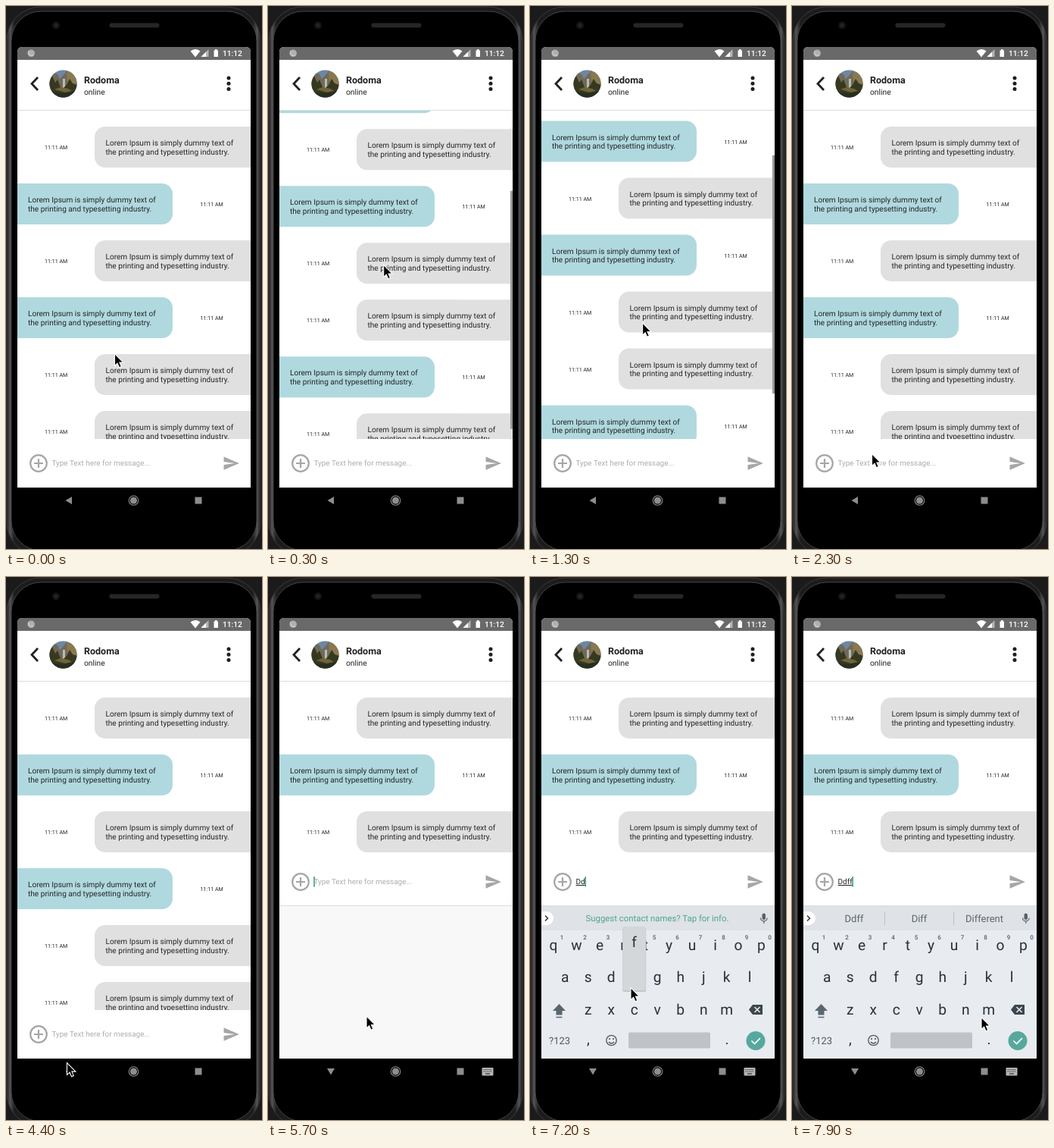
Animation, 338 px wide and 716 px high, one loop 8000 ms. Source, as an HTML page:

```html
<!DOCTYPE html>
<html lang="en">
<head>
<meta charset="utf-8">
<title>Chat screen</title>
<style>
  html, body { margin: 0; width: 100%; height: 100%; overflow: hidden; background: #1b1b1b; }
  svg { display: block; width: 100vw; height: 100vh; font-family: Roboto, Arial, sans-serif; text-rendering: geometricPrecision; }
  .msg { font-size: 10.1px; fill: #262626; }
  .time { font-size: 7.1px; fill: #222; }
  .key { font-size: 19.2px; fill: #263238; text-anchor: middle; }
  .digit { font-size: 8px; font-weight: 500; fill: #56616a; text-anchor: middle; }
  .hint { font-size: 13px; fill: #5c6770; text-anchor: middle; }
</style>
</head>
<body>
<svg viewBox="0 0 338 716" preserveAspectRatio="none">
  <defs>
    <clipPath id="face"><circle cx="75.5" cy="102.5" r="18"/></clipPath>
    <clipPath id="view"><rect id="viewRect" x="15" y="138" width="308"/></clipPath>
    <clipPath id="screen"><rect x="15" y="54" width="308" height="581"/></clipPath>
    <linearGradient id="rim" x2="1" y2="0">
      <stop offset="0" stop-color="#1a1a1a"/><stop offset=".013" stop-color="#555"/>
      <stop offset=".03" stop-color="#1c1c1c"/><stop offset=".97" stop-color="#1c1c1c"/>
      <stop offset=".987" stop-color="#555"/><stop offset="1" stop-color="#1a1a1a"/>
    </linearGradient>
  </defs>

  <g id="phone">
    <rect width="338" height="716" fill="#1b1b1b"/>
    <rect x="1" y="1" width="335" height="724" rx="45" fill="url(#rim)" stroke="#3a3a3a"/>
    <rect x="7" y="7" width="324" height="711" rx="39" fill="#000" stroke="#444"/>
    <circle cx="66" cy="25.500" r="5" fill="#121416"/>
    <circle cx="66" cy="25.500" r="2.500" fill="#20252c"/>
    <rect x="136.500" y="22.500" width="66" height="6" rx="3" fill="#262626"/>
    <path d="M15 635V60a6 6 0 0 1 6-6H317a6 6 0 0 1 6 6V635z" fill="#fff"/>
  </g>

  <g id="status">
    <path d="M15 71V60a6 6 0 0 1 6-6H317a6 6 0 0 1 6 6V71z" fill="#696969"/>
    <circle cx="33.200" cy="62.300" r="4.800" fill="#b0b0b0"/>
    <path d="M30 59a4.500 4.500 0 0 0 6 6" fill="none" stroke="#d6d6d6"/>
    <path d="M243.500 59.500q6.500-5 13 0L250 67.500z" fill="#fff"/>
    <path d="M267.500 57v10h-10z" fill="#b4b4b4"/><path d="M264 60.500v6.500h-6.500z" fill="#fff"/>
    <path d="M274.500 58.500h1.500v-1.500h2.500v1.500h1.500v8.500h-5.500z" fill="#fff"/>
    <text x="286" y="66" font-size="10.2" font-weight="500" fill="#fff">11:12</text>
  </g>

  <g id="header">
    <path d="M42 94l-8 8.500 8 8.500" fill="none" stroke="#222" stroke-width="2.800"/>
    <g clip-path="url(#face)">
      <rect x="57" y="84" width="37" height="37" fill="#6d87a3"/>
      <path d="M57 96l6-8 5 2 3 6 4-4 5-6 14 4v20H57z" fill="#716a58"/>
      <path d="M80 88l5-2 9 6v14H82z" fill="#8a7950"/>
      <path d="M75 96h3v12h-3z" fill="#b8bab4"/>
      <path d="M57 100l4-8 4 9 3-4 4 10 3 2 5-5 4-8 4 6 6 2v17H57z" fill="#363820"/>
      <path d="M64 110l8-3 10 2 5 3-9 2z" fill="#6f6436"/>
      <path d="M57 113l16 2 21-3v9H57z" fill="#292e22"/>
    </g>
    <text x="103" y="102" font-size="12.5" font-weight="700" fill="#1f1f1f">Rodoma</text>
    <text x="103" y="116.500" font-size="10.3" fill="#222">online</text>
    <g fill="#1f1f1f"><circle cx="294" cy="95" r="2.500"/><circle cx="294" cy="102.300" r="2.500"/><circle cx="294" cy="109.500" r="2.500"/></g>
    <path d="M15 137.500H323" stroke="#dcdcdc"/>
  </g>

  <g clip-path="url(#view)">
    <g id="list"></g>
    <rect id="thumb" x="320" width="3" height="314" fill="#989898"/>
  </g>

  <g id="composer">
    <rect x="15" y="571" width="308" height="64" fill="#fff"/>
    <g fill="none" stroke="#a6a6a6" stroke-width="2.200"><circle cx="43" cy="603" r="10.800"/><path d="M37 603h12M43 597v12"/></g>
    <text id="placeholder" x="60.500" y="606" font-size="9.95" fill="#adadad">Type Text here for message...</text>
    <text id="typed" x="60.500" y="606" font-size="10" fill="#222" text-decoration="underline"></text>
    <path id="caret" d="M0 596v13.500" stroke="#2f9184" stroke-width="1.500"/>
    <path transform="translate(285.600 591.400) scale(.97)" d="M2 21L23 12 2 3v7l15 2-15 2z" fill="#a6a6a6"/>
  </g>

  <g id="pane"><rect x="15" y="434" width="308" height="201" fill="#f8f8f8"/><path d="M15 433.500H323" stroke="#dcdcdc"/></g>
  <g id="keyboard" clip-path="url(#screen)">
    <rect x="15" y="434" width="308" height="201" fill="#e8ebef"/>
    <rect x="15" y="434" width="308" height="32" fill="#dfe2e6"/>
    <path d="M15 441h7a9 9 0 0 1 0 18h-7z" fill="#fff"/>
    <path d="M20 446.500l3.500 3.500-3.500 3.500" fill="none" stroke="#333" stroke-width="1.500"/>
    <text id="tip" x="168" y="454" font-size="11.4" fill="#4fa497" text-anchor="middle">Suggest contact names? Tap for info.</text>
    <g id="hints">
      <text class="hint" x="82" y="454.500">Ddff</text><text class="hint" x="168" y="454.500">Diff</text><text class="hint" x="254" y="454.500">Different</text>
      <path d="M122.500 441v18M213.500 441v18" stroke="#bcc2c7"/>
    </g>
    <rect x="306.500" y="443.500" width="4.500" height="8.500" rx="2.250" fill="#56616a"/>
    <path d="M304.500 449.500a4.300 4.300 0 0 0 8.600 0M308.800 454v3" fill="none" stroke="#56616a" stroke-width="1.200"/>
    <g id="keys"></g>
    <path id="shift" d="M38.500 563l8.500 9h-4.500v5.500h-8v-5.500H30z" fill="#5a666f"/>
    <path d="M34.500 580.500h8" stroke="#5a666f" stroke-width="1.500"/>
    <path d="M289 570.500l5-6.500h13v13h-13z" fill="#3c474e"/>
    <path d="M296.500 567l7 7m0-7l-7 7" stroke="#e8ebef" stroke-width="1.600"/>
    <text x="25" y="616" font-size="13" fill="#4d5960">?123</text>
    <text class="key" x="77" y="616">,</text><text class="key" x="260" y="616">.</text>
    <g fill="none" stroke="#4d5960" stroke-width="1.300"><circle cx="107.500" cy="611" r="6.700"/><path d="M104 613q3.500 4 7 0"/></g>
    <circle cx="105" cy="609" r="1.100" fill="#4d5960"/><circle cx="110" cy="609" r="1.100" fill="#4d5960"/>
    <rect x="130" y="600.500" width="108" height="21" rx="2" fill="#bfc3c8"/>
    <circle cx="298" cy="611.500" r="12.500" fill="#56a89d"/>
    <path d="M292.500 611.500l4 4 7.500-7.500" fill="none" stroke="#fff" stroke-width="1.700"/>
    <g id="popup">
      <rect x="-15.500" y="462" width="31" height="85" rx="2.500" fill="#c3c7ca"/>
      <rect x="-15" y="461" width="30" height="84" rx="2" fill="#d4d7d9"/>
      <text class="key" id="popupText" y="488"></text>
    </g>
  </g>

  <g id="nav" fill="#8d8d8d">
    <path id="back" d="M78.500 652l8.500-5v10z"/>
    <circle cx="168.500" cy="652" r="4.600"/><circle cx="168.500" cy="652" r="6.300" fill="none" stroke="#8d8d8d" stroke-width="1.100"/>
    <rect x="249.500" y="647.500" width="9" height="9"/>
    <g id="imeIcon">
      <rect x="282.500" y="647" width="15" height="10.500" rx="1" fill="#b5b5b5"/>
      <path d="M284.500 649.500h11M284.500 652h11" stroke="#333" stroke-width="1.200" stroke-dasharray="1.300 1"/>
      <path d="M287 655h6" stroke="#333" stroke-width="1.200"/>
    </g>
  </g>
  <path id="pointer" d="M.5.500v16l3.600-3.300 2.400 5.600 2.800-1.200-2.400-5.500h5z" fill="#000" stroke="#fff" stroke-width="1.100"/>
</svg>
<script>
const LOOP = 8000, MAX_SCROLL = 165;
const $ = id => document.getElementById(id);
const set = (id, attrs) => { for (const name in attrs) $(id).setAttribute(name, attrs[name]); };
const show = (id, on) => set(id, { visibility: on ? 'visible' : 'hidden' });
const clamp = x => Math.max(0, Math.min(1, x));
const progress = (t, from, to) => clamp((t - from) / (to - from));
const easeOut = x => 1 - (1 - x) ** 2;
const smooth = x => x * x * (3 - 2 * x);

$('list').innerHTML = [...'RLRLRRLR'].map((side, i) => {
  const right = side === 'R', y = 159 + 75 * i, x = right ? 131.5 : 29;
  const shape = right
    ? `M323 ${y}H131a14 14 0 0 0-14 14v26a14 14 0 0 0 14 14H323z`
    : `M15 ${y}H206a14 14 0 0 1 14 14v26a14 14 0 0 1-14 14H15z`;
  return `<path d="${shape}" fill="${right ? '#e0e0e0' : '#b0d9df'}"/>
    <text class="msg" x="${x}" y="${y + 25}">Lorem Ipsum is simply dummy text of</text>
    <text class="msg" x="${x}" y="${y + 36.7}">the printing and typesetting industry.</text>
    <text class="time" x="${right ? 51 : 256.5}" y="${y + 30}">11:11 AM</text>`;
}).join('');

const rows = [['qwertyuiop', 31, 492], ['asdfghjkl', 46.2, 534], ['zxcvbnm', 76.7, 576.5]];
$('keys').innerHTML = rows.map(([letters, x0, y], row) => [...letters].map((letter, i) => {
  const x = x0 + 30.5 * i;
  const digit = row ? '' : `<text class="digit" x="${x + 11}" y="478">${(i + 1) % 10}</text>`;
  return `<text class="key letter" x="${x}" y="${y}">${letter}</text>${digit}`;
}).join('')).join('');
const letters = [...document.querySelectorAll('.letter')].map(el => ({ el, lower: el.textContent }));

// time, x, y of the pointer tip
const path = [
  [0, 143, 458], [100, 144, 452], [400, 155, 302], [1000, 152, 306], [1500, 146, 478],
  [2300, 105, 590], [2800, 92, 603], [3600, 84, 606], [4200, 80, 640], [4700, 80, 640],
  [5300, 114, 601], [5500, 122, 594], [5700, 129.5, 578.5], [6400, 104, 538], [7000, 104, 538],
  [7200, 132.5, 541], [7600, 132.5, 541], [7900, 249.5, 580], [8000, 249.5, 580]
];
const presses = [[6500, 6600, 'D', 107.2], [6900, 7000, 'd', 107.2], [7200, 7300, 'f', 137.7], [7500, 7600, 'f', 137.7]];

function pointerAt(t) {
  const i = path.findIndex(point => point[0] > t);
  const [t0, x0, y0] = path[i - 1], [t1, x1, y1] = path[i];
  const k = smooth(progress(t, t0, t1));
  return [x0 + (x1 - x0) * k, y0 + (y1 - y0) * k];
}

function render(time) {
  const t = Math.floor(time % LOOP / 100) * 100;
  const scroll = MAX_SCROLL * (easeOut(progress(t, 100, 400)) - smooth(progress(t, 1000, 1600)));
  const open = t >= 5600, keys = t >= 5800, caps = t < 6600;
  const typed = presses.filter(p => t >= p[1]).map(p => p[2]).join('');

  set('list', { transform: `translate(0 ${-scroll})` });
  set('thumb', { y: 137 + scroll * 120 / MAX_SCROLL,
    opacity: progress(t, 0, 200) * (1 - progress(t, 700, 900)) + progress(t, 1000, 1100) * (1 - progress(t, 1800, 2000)) });
  set('viewRect', { height: open ? 232 : 433 });
  set('composer', { transform: `translate(0 ${open ? -201 : 0})` });
  show('pane', open);
  show('keyboard', keys);
  show('imeIcon', open);
  set('back', { d: open ? 'M78 648h10l-5 8.500z' : 'M78.500 652l8.500-5v10z' });

  $('typed').textContent = typed;
  show('placeholder', !typed);
  show('caret', open);
  const width = typed ? $('typed').getComputedTextLength() : 0;
  set('caret', { transform: `translate(${61 + width} 0)` });

  letters.forEach(({ el, lower }) => el.textContent = caps ? lower.toUpperCase() : lower);
  set('shift', { fill: caps ? '#56a89d' : '#5a666f' });
  const hints = t >= 7600;
  set('tip', { opacity: hints ? 0 : 1 });
  set('hints', { opacity: hints ? 1 : 0 });

  const press = presses.find(p => t >= p[0] && t < p[1]);
  set('popup', { opacity: press ? 1 : 0 });
  if (press) {
    set('popup', { transform: `translate(${press[3]} 0)` });
    $('popupText').textContent = press[2];
  }
  set('pointer', { transform: `translate(${pointerAt(t).join(' ')})` });
}

const start = performance.now();
function tick() {
  render(performance.now() - start);
  requestAnimationFrame(tick);
}
tick();
</script>
</body>
</html>
```
